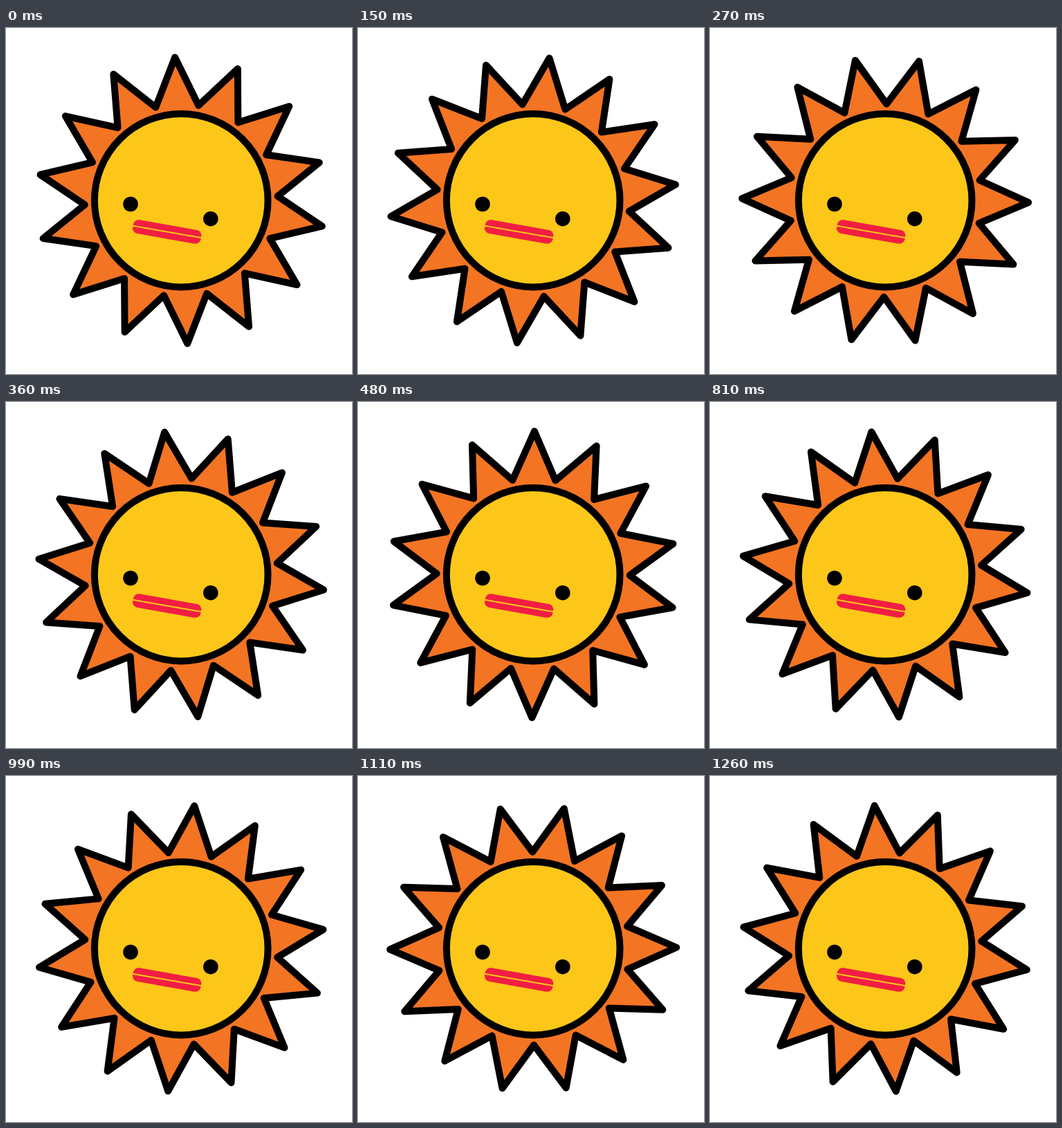
Write an HTML page with a canvas that moves like this. It is 500 px wide and 500 px high and loops after 1.29 s.

```html
<!DOCTYPE html>
<html lang="en">
<head>
<meta charset="utf-8">
<title>Spinning sun</title>
<style>
  html, body { margin: 0; width: 100%; height: 100%; overflow: hidden; background: #fff; }
  canvas { display: block; width: 500px; height: 500px; }
</style>
</head>
<body>
<canvas id="stage" width="500" height="500"></canvas>
<script>
const ctx = document.getElementById('stage').getContext('2d');

const STEP_MS = 30;
const STEPS = 43;
const SPIKES = 14;
const SPIKES_PER_LOOP = 3;
const SPIKE_ANGLE = 2 * Math.PI / SPIKES;
const START_ANGLE = -2.5 * Math.PI / 180;
const CENTER = { x: 253.2, y: 249.2 };
const BLACK = '#000', ORANGE = '#f37423', YELLOW = '#fcc718', RED = '#f11e42';

function disc(x, y, radius, fill, outlined) {
  ctx.beginPath();
  ctx.arc(x, y, radius, 0, 2 * Math.PI);
  ctx.fillStyle = fill;
  ctx.fill();
  if (outlined) ctx.stroke();
}

function drawRays(angle) {
  ctx.beginPath();
  for (let i = 0; i < SPIKES * 2; i++) {
    const radius = i % 2 ? 139.5 : 207;
    const a = angle + i * SPIKE_ANGLE / 2;
    ctx.lineTo(CENTER.x + radius * Math.sin(a), CENTER.y - radius * Math.cos(a));
  }
  ctx.closePath();
  ctx.fillStyle = ORANGE;
  ctx.fill();
  ctx.stroke();
}

function drawMouth() {
  ctx.save();
  ctx.translate(232.7, 294.5);
  ctx.rotate(10 * Math.PI / 180);
  ctx.beginPath();
  ctx.roundRect(-50, -10, 100, 20, 8);
  ctx.fillStyle = RED;
  ctx.fill();
  ctx.fillStyle = YELLOW;
  ctx.fillRect(-51, -1, 102, 2);
  ctx.restore();
}

function draw(now) {
  const step = Math.floor(now / STEP_MS) % STEPS;
  ctx.fillStyle = '#fff';
  ctx.fillRect(0, 0, 500, 500);
  ctx.strokeStyle = BLACK;
  ctx.lineWidth = 10;
  ctx.lineJoin = 'round';

  drawRays(START_ANGLE + step / STEPS * SPIKES_PER_LOOP * SPIKE_ANGLE);
  disc(CENTER.x, CENTER.y, 125.3, YELLOW, true);
  disc(180, 254.5, 10.8, BLACK);
  disc(295.8, 275.7, 10.8, BLACK);
  drawMouth();
}

const start = performance.now();
function tick() {
  draw(performance.now() - start);
  requestAnimationFrame(tick);
}
tick();
</script>
</body>
</html>
```
